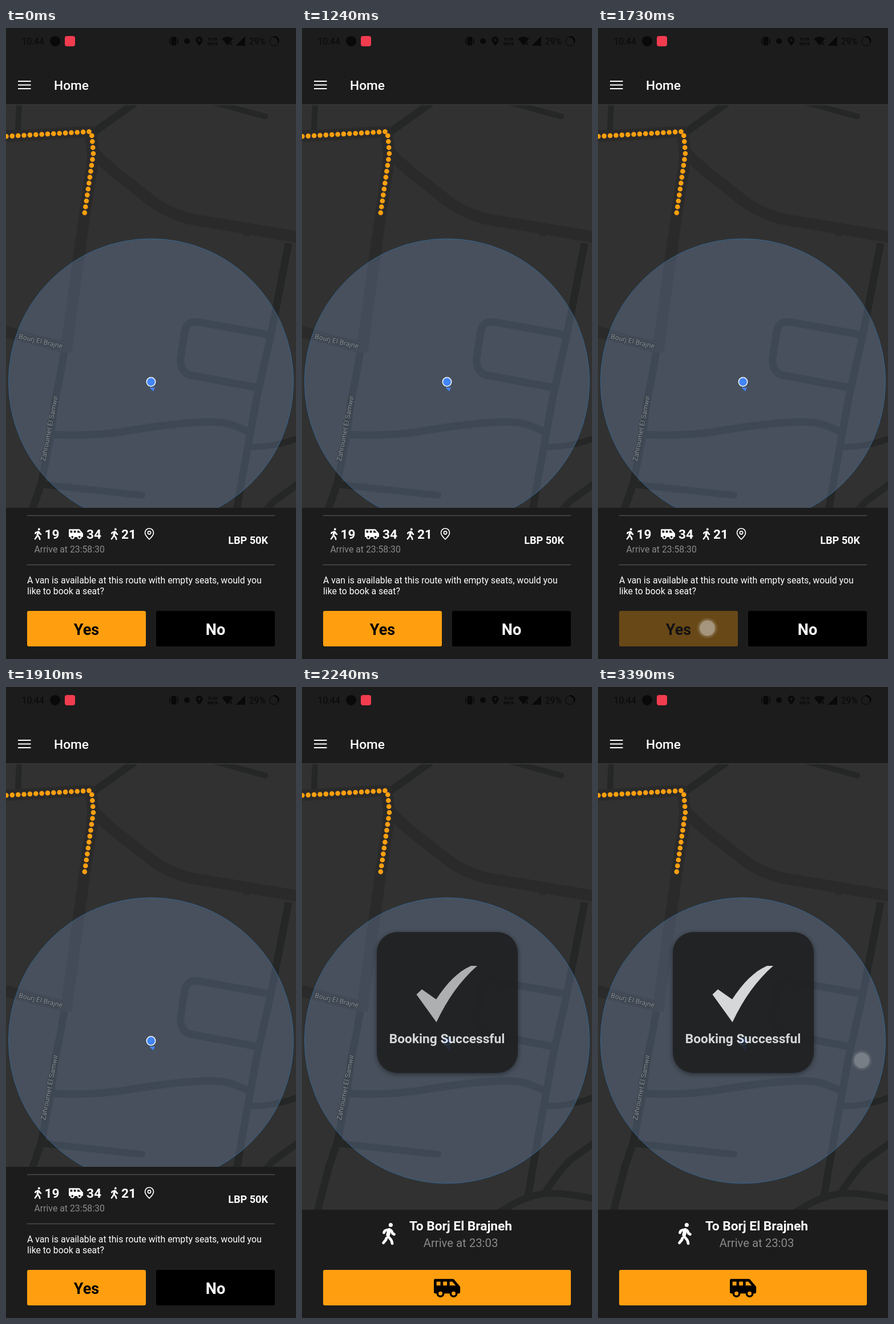
An HTML page for the animation above (3420 ms loop, 508 by 1102 pixels).

```html
<!DOCTYPE html>
<html lang="en">
<head>
<meta charset="utf-8">
<title>Book a seat</title>
<style>
  html, body { margin: 0; width: 100%; height: 100%; overflow: hidden; background: #1c1c1c; }
  svg { display: block; width: 508px; height: 1102px; font-family: Roboto, sans-serif; }
  .bold { font-weight: 700; }
  .mid { text-anchor: middle; }
  .line { fill: none; stroke-linejoin: round; }
  .main { stroke: #2a2a2a; stroke-width: 20; }
  .minor { stroke: #252626; stroke-width: 13; }
  .dots { stroke: #ff9f0f; stroke-width: 8.6; stroke-linecap: round; }
  .street { fill: #88919a; font-size: 12.2px; stroke: #343a41; stroke-width: 2px; paint-order: stroke; }
  .speed { font-size: 8px; font-weight: 700; }
  .card { filter: drop-shadow(0 2px 4px #0008); }
</style>
</head>
<body>
<svg viewBox="0 0 508 1102">
  <defs>
    <clipPath id="mapArea"><rect y="134" width="508" height="779"/></clipPath>
    <radialGradient id="glow">
      <stop offset="0" stop-color="#ddd" stop-opacity=".76"/>
      <stop offset=".66" stop-color="#ddd" stop-opacity=".74"/>
      <stop offset=".76" stop-color="#ddd" stop-opacity=".3"/>
      <stop offset="1" stop-color="#ddd" stop-opacity="0"/>
    </radialGradient>
    <g id="walker">
      <circle cx="20.8" cy="4.8" r="4.8" fill="#fff"/>
      <g fill="none" stroke="#fff" stroke-width="6.4" stroke-linecap="round" stroke-linejoin="round">
        <path d="M4.5 23L7 18.5Q8 17 16.5 16L13.8 28.5Q13.5 31 15.5 33L21 39Q22.5 41 23 43L24.5 48.5"/>
        <path d="M16.5 16Q22 16 24 21.5L25 24.5L29 26.8M10.5 36L9.5 39.5L3.5 47"/>
        <path d="M17 17L14.5 28" stroke-width="9"/>
      </g>
    </g>
    <path id="van" fill-rule="evenodd" d="M63 21L49.4 5A5 5 0 0 0 45.8 3.2H3.2A3.2 3.2 0 0 0 0 6.4V35.2A3.2 3.2 0 0 0 3.2 38.4H6.4A9.6 9.6 0 0 0 25.6 38.4H38.4A9.6 9.6 0 0 0 57.6 38.4H60.8A3.2 3.2 0 0 0 64 35.2V24Q64 22 63 21ZM6.4 9.6H16V19.2H6.4ZM22.4 9.6H32V19.2H22.4ZM38.4 9.6H45L53 19.2H38.4ZM11.2 38.4a4.8 4.8 0 1 0 9.6 0a4.8 4.8 0 1 0-9.6 0M43.2 38.4a4.8 4.8 0 1 0 9.6 0a4.8 4.8 0 1 0-9.6 0"/>
  </defs>
  <rect width="508" height="1102" fill="#1c1c1c"/>

  <!-- status bar -->
  <g fill="#090909" font-size="15.8">
    <text x="27.5" y="28.5">10:44</text>
    <circle cx="86" cy="23" r="9"/>
    <rect x="103" y="14" width="18" height="18" rx="4" fill="#f23c50"/>
    <rect x="289.5" y="15.5" width="9" height="15" rx="1.5"/>
    <path d="M287 18.5v9M301 18.5v9" stroke="#090909" stroke-width="1.6"/>
    <circle cx="317" cy="23" r="5"/>
    <path fill-rule="evenodd" d="M338.500 31Q332.500 24.500 332.500 21a6 6 0 0 1 12 0Q344.500 24.500 338.500 31ZM336.300 21a2.200 2.200 0 1 0 4.400 0a2.200 2.200 0 1 0-4.400 0"/>
    <g class="speed mid">
      <text id="slow" x="362" y="22">5.00</text>
      <text id="fast" x="362" y="22">10.0</text>
      <text x="362" y="30">KB/S</text>
    </g>
    <path d="M378.500 18.500Q388 12 397.500 18.500L388 30.500ZM402.500 31H419V14.500Z"/>
    <path d="M392 25l4 5m0-5l-4 5" stroke="#090909" stroke-width="1.2"/>
    <text x="425.500" y="28.500">29%</text>
    <circle cx="469.500" cy="23" r="7.800" fill="none" stroke="#111" stroke-width="1.800"/>
    <path d="M469.500 15.200a7.800 7.800 0 0 1 7.500 10" fill="none" stroke="#050505" stroke-width="2.400"/>
  </g>

  <!-- title bar -->
  <path d="M21 93h22.500M21 99.500h22.500M21 106h22.500" stroke="#fff" stroke-width="2.200"/>
  <text x="84" y="108" font-size="22.700" font-weight="500" fill="#fff">Home</text>

  <!-- map -->
  <g clip-path="url(#mapArea)">
    <rect y="134" width="508" height="779" fill="#313131"/>
    <g class="line minor">
      <path d="M23 130L21 178" stroke-width="10"/>
      <path d="M155 181L226 131"/>
      <path d="M364 130L454 154.500" style="stroke-width:10;stroke-linecap:round"/>
      <path d="M102 566L95 606L86 650L78 712L62 795L47 838L26 920"/>
      <path d="M495 376L464 536L440 642L418 762L396 888"/>
      <path d="M462 536L340 514Q317 510 313 530L306 575Q304 600 322 606L440 628"/>
      <path d="M82 710C130 713 180 709 210 704S300 690 345 688S400 695 425 705"/>
      <path d="M425 732Q470 732 510 717" style="stroke-width:11"/>
      <path d="M62 797L238 816" style="stroke-width:12;stroke-linecap:round"/>
      <path d="M512 796L470 826Q448 848 424 886" style="stroke-width:12"/>
      <path d="M345 918Q390 888 425 885T512 894" style="stroke-width:12"/>
    </g>
    <g class="line main">
      <path d="M0 189L147 181Q155 210 150 245L138 325L122 440L105 566"/>
      <path d="M152 215Q168 233 190 251L255 302Q295 332 350 338L510 365"/>
      <path d="M-4 530L104 558"/>
      <path d="M415 358l12 2.500" stroke-width="8"/>
    </g>
    <circle cx="254" cy="617.500" r="249.500" fill="rgb(150,190,245)" fill-opacity=".22" stroke="#346492"/>
    <path class="line dots" stroke-dasharray="0 10.370" d="M.5 189.200L146.500 181"/>
    <path class="line dots" stroke-dasharray="0 10.450" d="M150.300 188Q151.500 199 153 219L137.500 324.500"/>
    <text class="street mid" transform="translate(60 551) rotate(13)">Bourj El Brajne</text>
    <text class="street mid" transform="translate(80 700) rotate(-79)">Zahroumet El Samwir</text>
    <path d="M251.500 628.500L261 627.500L258 634.500Z" fill="#4285f4"/>
    <circle cx="254" cy="618" r="7.700" fill="#4285f4" stroke="#fff" stroke-width="1.500"/>
  </g>
  <path d="M0 134h508" stroke="#474747"/>

  <!-- trip panel -->
  <use href="#walker" transform="translate(140 936) scale(.74)"/>
  <text class="bold mid" x="278" y="949" font-size="22.700" fill="#fff">To Borj El Brajneh</text>
  <text class="mid" x="278" y="978" font-size="20.300" fill="#8a8a8a">Arrive at 23:03</text>
  <rect x="37" y="1018" width="434" height="62" rx="3" fill="#ff9f0f"/>
  <use href="#van" transform="translate(231 1031.500) scale(.72)"/>

  <!-- offer panel -->
  <g id="offer" fill="#fff">
    <rect y="838" width="508" height="264" fill="#1c1c1c"/>
    <path d="M37 851.500h434M37 937.500h434" stroke="#4c4c4c" stroke-width="1.500"/>
    <use href="#walker" transform="translate(49.500 873.500) scale(.4)"/>
    <use href="#van" transform="translate(110 874) scale(.39)"/>
    <use href="#walker" transform="translate(183.500 873.500) scale(.4)"/>
    <g class="bold" font-size="22.700">
      <text x="67.500" y="892">19</text>
      <text x="141" y="892">34</text>
      <text x="202" y="892">21</text>
    </g>
    <g fill="none" stroke="#fff" stroke-width="1.700">
      <path d="M251 893Q243.500 886 243.500 881.500a7.500 7.500 0 0 1 15 0Q258.500 886 251 893Z"/>
      <circle cx="251" cy="881.500" r="2.600"/>
    </g>
    <text x="49.500" y="916" font-size="15.800" fill="#8a8a8a">Arrive at 23:58:30</text>
    <text class="bold" x="459" y="901" font-size="18.100" text-anchor="end">LBP 50K</text>
    <g font-size="15.800">
      <text x="37" y="969.500">A van is available at this route with empty seats, would you</text>
      <text x="37" y="988.500">like to book a seat?</text>
    </g>
    <g class="bold mid" font-size="27">
      <g id="yes">
        <rect x="37" y="1018" width="208" height="62" rx="3" fill="#ff9f0f"/>
        <text x="141" y="1059.500" fill="#000">Yes</text>
      </g>
      <rect x="263" y="1018" width="208" height="62" rx="3" fill="#000"/>
      <text x="367" y="1059.500">No</text>
    </g>
  </g>

  <!-- confirmation -->
  <g id="modal" fill="#f0f0f0">
    <rect class="card" x="131" y="428" width="247" height="246" rx="36" fill="#1c1c1c"/>
    <path id="check" d="M200.500 537L210 528L235 545.500C254 517 273 497 296 487H307C278 512 254 546 235.500 585.500Z"/>
    <text class="bold mid" x="254" y="622" font-size="22.700">Booking Successful</text>
  </g>

  <circle id="tapYes" cx="191.500" cy="1048" r="19" fill="url(#glow)"/>
  <circle id="tapMap" cx="462" cy="652" r="19" fill="url(#glow)"/>
</svg>
<script>
  const LOOP = 3420;

  // Each step is [time in ms, opacity, easing to the next step].
  const tracks = {
    yes: [[0, 1], [1610, 1], [1610, .2], [1660, .2, 'ease-in-out'], [1910, 1], [LOOP, 1]],
    offer: [[0, 1], [2030, 1], [2030, 0], [LOOP, 0]],
    modal: [[0, 0], [2030, 0], [2090, .85], [LOOP, .85]],
    check: [[0, 0], [2030, 0], [2300, 1], [LOOP, 1]],
    slow: [[0, 1], [2330, 1], [2330, 0], [LOOP, 0]],
    fast: [[0, 0], [2330, 0], [2330, 1], [LOOP, 1]],
    tapYes: tap(1580, 1670),
    tapMap: tap(3150, 3280)
  };

  // A touch spot shows at once and fades for 200 ms after release.
  function tap(down, up) {
    const steps = [[0, 0], [down, 0], [down, 1], [up, 1]];
    const gone = up + 200;
    return gone < LOOP
      ? [...steps, [gone, 0], [LOOP, 0]]
      : [...steps, [LOOP, (gone - LOOP) / 200]];
  }

  for (const [id, steps] of Object.entries(tracks)) {
    const frames = steps.map(([time, opacity, easing = 'linear']) =>
      ({ offset: time / LOOP, opacity, easing }));
    document.getElementById(id).animate(frames, { duration: LOOP, iterations: Infinity });
  }
</script>
</body>
</html>
```
